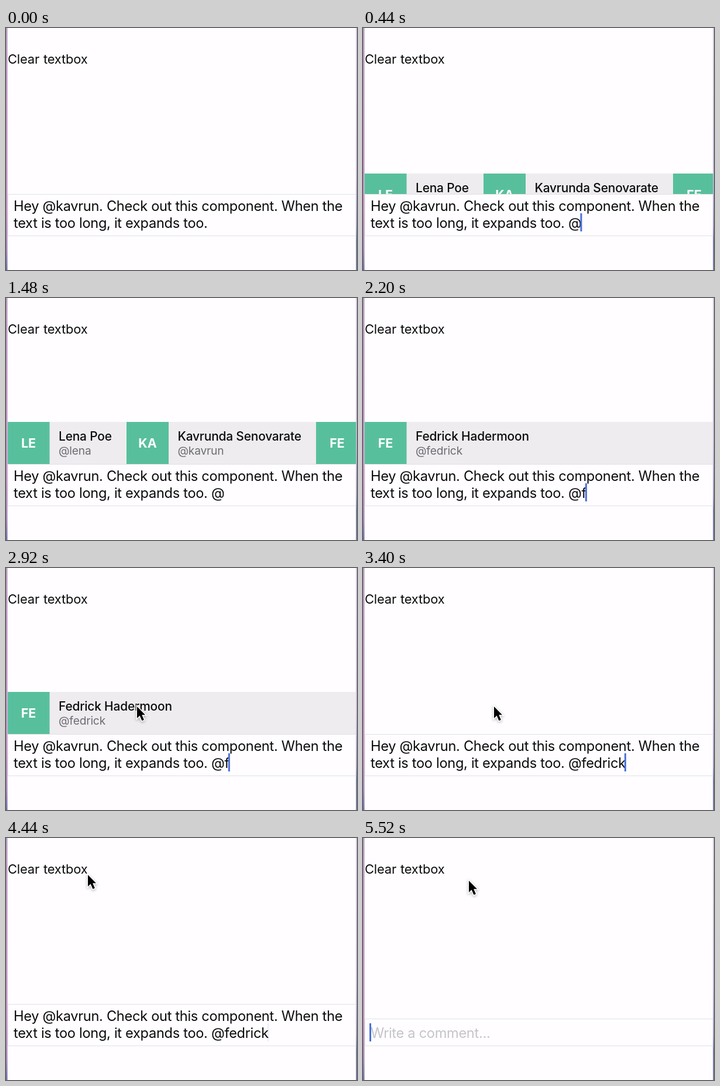
These frames come from a looping animation (600 by 414 pixels, 5.56 s). An HTML page with a canvas:

```html
<!DOCTYPE html>
<html lang="en">
<head>
<meta charset="utf-8">
<title>Mention suggestions</title>
<style>
  html, body { margin: 0; width: 100%; height: 100%; overflow: hidden; background: #fffdff; }
  canvas { display: block; }
</style>
</head>
<body>
<canvas id="stage" width="600" height="414"></canvas>
<script>
const ctx = document.getElementById('stage').getContext('2d');
const LOOP = 5560;
const LEFT = 2.5, RIGHT = 598.4;
const ROW_TOP = 212, BOX_TOP = 284, BOX_BOTTOM = 355, ROW_HEIGHT = 72;
const GREEN = '#58bf9c', GREY = '#eeecef', INK = '#0b0b0c';

// Moments of input: space, at sign, letter, chosen name, cleared box
const KEYS = [160, 360, 2040, 3180, 4960];
const LINE_1 = 'Hey @kavrun. Check out this component. When the';
const LINE_2 = 'text is too long, it expands too.';
const ENDINGS = ['', ' ', ' @', ' @f', ' @fedrick'];

const PEOPLE = [
  { name: 'Lena Poe', user: '@lena', tag: 'LE', x: LEFT, end: 206 },
  { name: 'Kavrunda Senovarate', user: '@kavrun', tag: 'KA', x: 206, end: 530 },
  { name: 'Fedrick Hadermoon', user: '@fedrick', tag: 'FE', x: 530, end: RIGHT }
];
const MATCH = { ...PEOPLE[2], x: LEFT };

// Pointer stops: time, x, y
const PATH = [
  [2400, 262, 418], [2840, 224, 237], [3500, 224, 237], [4320, 140, 63],
  [4440, 140, 63], [4640, 112, 56], [4980, 112, 56], [5160, 117, 59], [5480, 181, 73]
];

const STYLES = {
  body: { font: '400 23.6px', spacing: '-0.3px' },
  button: { font: '400 21.9px', spacing: '-0.17px', words: '1px' },
  name: { font: '500 20.9px', spacing: '-0.18px' },
  user: { font: '400 19.2px', spacing: '-0.2px' },
  tag: { font: '700 21.5px', spacing: '0px' }
};

const clamp = v => Math.min(1, Math.max(0, v));
const ease = v => { v = clamp(v); return v * v * (3 - 2 * v); };

function setStyle({ font, spacing, words = '0px' }) {
  ctx.font = font + ' Inter, "Open Sans", sans-serif';
  ctx.letterSpacing = spacing;
  ctx.wordSpacing = words;
}

function text(str, x, y, style, color = INK, align = 'left') {
  setStyle(STYLES[style]);
  ctx.textAlign = align;
  ctx.fillStyle = color;
  ctx.fillText(str, x, y);
}

function rect(x, y, w, h, color) {
  ctx.fillStyle = color;
  ctx.fillRect(x, y, w, h);
}

function strip(x, w, colors) {
  const g = ctx.createLinearGradient(0, 0, 0, 414);
  colors.forEach(([stop, color]) => g.addColorStop(stop, color));
  rect(x, 0, w, 414, g);
}

function drawBackground() {
  rect(0, 0, 600, 414, '#fffdff');
  strip(0, LEFT, [[0, '#b49cbd'], [.3, '#bf94c2'], [.75, '#c08fc0'], [.92, '#a286ba'], [1, '#7470a8']]);
  strip(RIGHT, 600 - RIGHT, [[0, '#c9bbd8'], [.6, '#b9abd0'], [.82, '#8f8ab4'], [.88, '#5f6992'], [1, '#666b98']]);
}

function drawPerson({ name, user, tag, x, end }, top) {
  ctx.save();
  ctx.beginPath();
  ctx.rect(x, top, end - x, ROW_HEIGHT);
  ctx.clip();
  rect(x, top, end - x, ROW_HEIGHT, GREY);
  rect(x, top, 72, ROW_HEIGHT, GREEN);
  text(tag, x + 36, top + 44, 'tag', '#fff', 'center');
  text(name, x + 87.5, top + 32, 'name');
  text(user, x + 87.5, top + 56, 'user', '#6d6c71');
  ctx.restore();
}

function drawRow(t) {
  const open = ease((t - 392) / 100) - ease((t - KEYS[3]) / 100);
  if (open <= 0) return;
  const top = Math.round(BOX_TOP - open * (BOX_TOP - ROW_TOP));
  ctx.save();
  ctx.beginPath();
  ctx.rect(0, top, 600, BOX_TOP - top);
  ctx.clip();
  (t < KEYS[2] ? PEOPLE : [MATCH]).forEach(p => drawPerson(p, top));
  ctx.restore();
}

// Solid for a while after input, otherwise fading in and out each second
function caretAlpha(t) {
  const last = KEYS.filter(k => k <= t).pop();
  if (last === undefined) return 0;
  if (t - last < 600) return 1;
  const p = t % 1000;
  return 1 - clamp((p - 340) / 110) + clamp((p - 800) / 100);
}

function drawBox(t) {
  const typed = KEYS.filter(k => k <= t).length;
  const empty = typed === KEYS.length;
  const top = empty ? 309 : BOX_TOP;
  rect(LEFT, top, RIGHT - LEFT, 1, '#e1e0e5');
  rect(LEFT, BOX_BOTTOM, RIGHT - LEFT, 1, '#e1e0e5');
  rect(3, top, 1, BOX_BOTTOM - top, '#e9e7ed');
  drawRow(t);

  const line = empty ? '' : LINE_2 + ENDINGS[typed];
  if (empty) text('Write a comment...', 13, 342, 'body', '#c5c4c9');
  else {
    text(LINE_1, 13, 313, 'body');
    text(line, 13, 342, 'body');
  }
  ctx.globalAlpha = caretAlpha(t);
  rect(11 + ctx.measureText(line).width, 317, 3, 31, '#4a70db');
  ctx.globalAlpha = 1;
}

function pointerAt(t) {
  const i = PATH.findIndex(p => p[0] > t);
  if (i === 0) return null;
  if (i < 0) return PATH[PATH.length - 1].slice(1);
  const [t0, x0, y0] = PATH[i - 1], [t1, x1, y1] = PATH[i];
  const k = ease((t - t0) / (t1 - t0));
  return [x0 + (x1 - x0) * k, y0 + (y1 - y0) * k];
}

const arrow = new Path2D('M0 0V20L4.6 15.6L8.4 24.2L11.9 22.7L8.2 14.2H14Z');

function drawPointer(t) {
  const at = pointerAt(t);
  if (!at) return;
  ctx.save();
  ctx.translate(...at);
  ctx.shadowColor = 'rgba(0,0,0,.3)';
  ctx.shadowBlur = 4;
  ctx.shadowOffsetY = 1.5;
  ctx.strokeStyle = '#fff';
  ctx.lineWidth = 3;
  ctx.stroke(arrow);
  ctx.shadowColor = 'transparent';
  ctx.fillStyle = '#000';
  ctx.fill(arrow);
  ctx.restore();
}

function draw(t) {
  drawBackground();
  text('Clear textbox', 3, 61, 'button');
  drawBox(t);
  drawPointer(t);
}

const start = performance.now();
function tick() {
  draw((performance.now() - start) % LOOP);
  requestAnimationFrame(tick);
}
tick();
</script>
</body>
</html>
```
